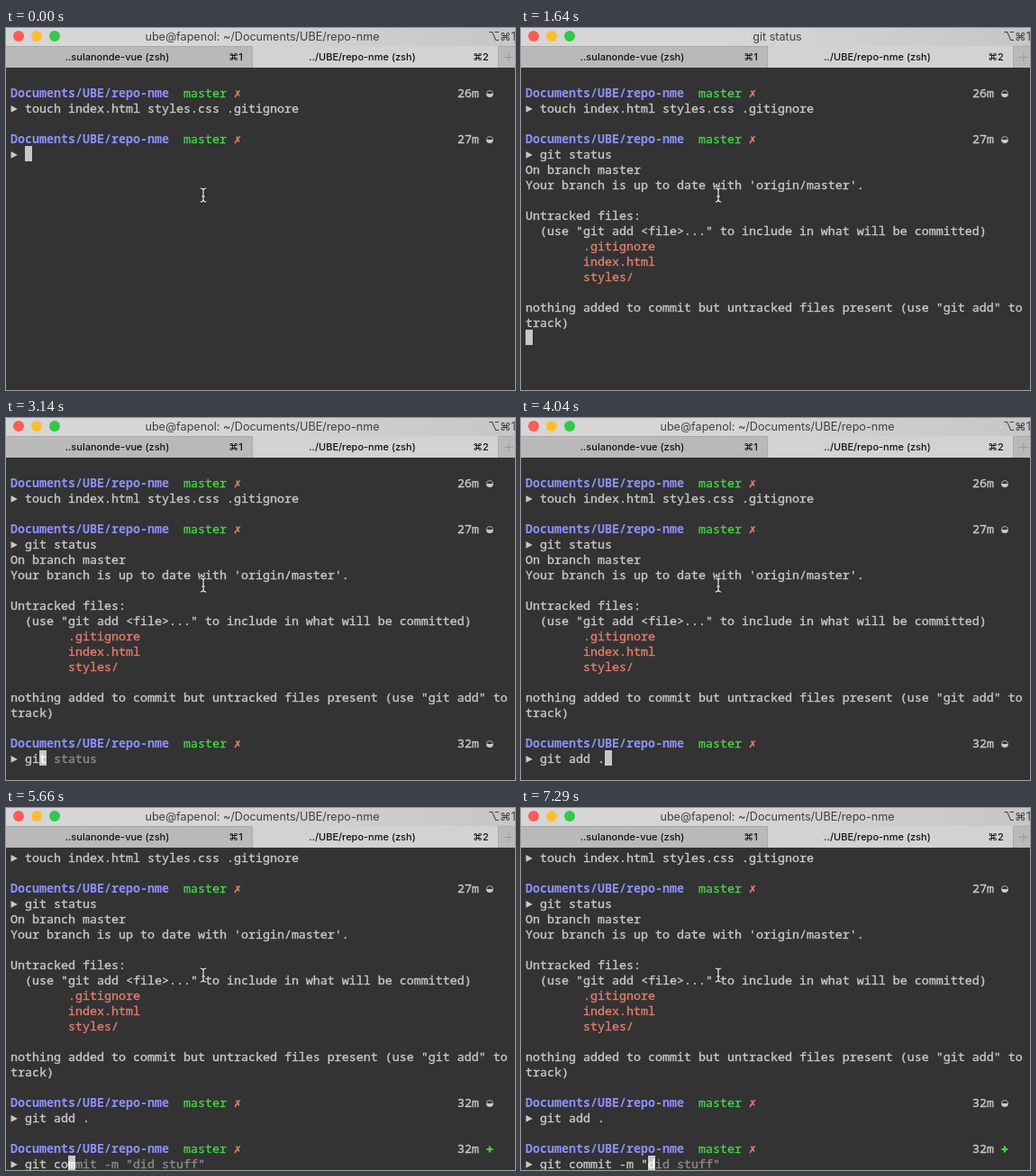
Animation, 565 px wide and 402 px high, one loop 8 s. Source, as an HTML page:

```html
<!DOCTYPE html>
<html lang="en">
<head>
<meta charset="utf-8">
<title>Terminal</title>
<style>
  html, body { margin: 0; width: 100%; height: 100%; overflow: hidden; background: #333; }
  svg { display: block; }
  text { white-space: pre; }
  .term text { font: 13.333px "Noto Sans Mono", "DejaVu Sans Mono", monospace; stroke-width: .35; }
  .term .bold { font-weight: 700; stroke-width: 0; }
  .bar text { font: 500 11px Inter, "DejaVu Sans", sans-serif; fill: #111; text-anchor: middle; }
  .bar .title { font-size: 12.6px; font-weight: 400; fill: #404040; }
</style>
</head>
<body>
<svg width="565" height="402" viewBox="0 0 565 402">
  <defs>
    <linearGradient id="chrome">
      <stop offset=".4" stop-color="#d6d6d6"/><stop offset="1" stop-color="#c6c6c6"/>
    </linearGradient>
    <path id="beam" d="M216 178Q219 178 219 180.5Q219 178 222 178M219 180.5V190.5M216 193Q219 193 219 190.5Q219 193 222 193M217.5 187H220.5"/>
  </defs>
  <rect width="565" height="402" fill="#333"/>
  <g class="term" id="term"></g>
  <g class="bar">
    <rect width="565" height="20" fill="url(#chrome)"/>
    <rect y="20" width="565" height="24" fill="#b9b9b9"/>
    <rect x="274" y="20" width="272" height="24" fill="#d2d2d2"/>
    <path d="M0 20.5H273.5V44M546.5 44V20.5H565" fill="none" stroke="#a9a9a9"/>
    <circle cx="14" cy="9" r="6" fill="#fc5b56"/>
    <circle cx="34" cy="9" r="6" fill="#fdbd30"/>
    <circle cx="54" cy="9" r="6" fill="#34c749"/>
    <text class="title" id="title" x="284.5" y="14"></text>
    <text class="title" x="550.5" y="14">⌥⌘1</text>
    <text x="123.5" y="36">..sulanonde-vue (zsh)</text>
    <text x="255" y="36">⌘1</text>
    <text id="tab" x="395.5" y="36"></text>
    <text x="527" y="36">⌘2</text>
    <path d="M553 32.5H563M558 27.5V37.5" stroke="#999"/>
  </g>
  <g fill="none" stroke-linecap="round">
    <use href="#beam" stroke="#222" stroke-width="2.4"/>
    <use href="#beam" stroke="#f0f0f0" stroke-width="1.2"/>
  </g>
</svg>
<script>
const LOOP = 8000, CELL = 8, ROW = 17, LEFT = 5, TOP = 63;
const FG = '#c9c9c9', BLUE = '#8d90ff', GREEN = '#43d545', RED = '#e47d6d', GHOST = '#8b8b8b', CURSOR = '#c7c7c7';
const PATH = 'Documents/UBE/repo-nme';
const STATUS = 'git status', ADD = 'git add .', COMMIT = 'git commit -m "did stuff"';
const OUTPUT = [
  'On branch master',
  "Your branch is up to date with 'origin/master'.",
  '',
  'Untracked files:',
  '  (use "git add <file>..." to include in what will be committed)',
  '        .gitignore',
  '        index.html',
  '        styles/',
  '',
  'nothing added to commit but untracked files present (use "git add" to',
  'track)'
];

const [TYPE_STATUS, RUN_STATUS, DONE_STATUS, TYPE_ADD, RUN_ADD, DONE_ADD, TYPE_COMMIT] = [0, 1, 2, 3, 4, 5, 6];

// [time, stage, characters typed]
const STEPS = [
  [0, TYPE_STATUS, 0], [600, TYPE_STATUS, 1], [750, TYPE_STATUS, 2], [900, TYPE_STATUS, 3],
  [1040, TYPE_STATUS, 5], [1190, TYPE_STATUS, 6], [1340, TYPE_STATUS, 8], [1490, TYPE_STATUS, 10],
  [1640, RUN_STATUS, 0], [1790, DONE_STATUS, 0], [1940, TYPE_ADD, 0],
  [3140, TYPE_ADD, 2], [3290, TYPE_ADD, 3], [3440, TYPE_ADD, 4], [3590, TYPE_ADD, 5],
  [3740, TYPE_ADD, 6], [3890, TYPE_ADD, 8], [4040, TYPE_ADD, 9],
  [4180, RUN_ADD, 9], [4330, DONE_ADD, 0], [4470, TYPE_COMMIT, 0],
  [5070, TYPE_COMMIT, 1], [5220, TYPE_COMMIT, 2], [5370, TYPE_COMMIT, 3], [5520, TYPE_COMMIT, 5],
  [5660, TYPE_COMMIT, 6], [5810, TYPE_COMMIT, 7], [5960, TYPE_COMMIT, 8], [6100, TYPE_COMMIT, 9],
  [6250, TYPE_COMMIT, 10], [6400, TYPE_COMMIT, 11], [6540, TYPE_COMMIT, 12],
  [6690, TYPE_COMMIT, 13], [6840, TYPE_COMMIT, 14], [7290, TYPE_COMMIT, 15]
];

const $ = id => document.getElementById(id);
const term = $('term');
let scroll = 0;

const colX = col => LEFT + col * CELL;
const rowY = row => TOP + (row - scroll) * ROW;
const visible = row => rowY(row) >= 46;

function add(tag, attrs, text = '') {
  const el = document.createElementNS('http://www.w3.org/2000/svg', tag);
  for (const k in attrs) el.setAttribute(k, attrs[k]);
  el.textContent = text;
  term.append(el);
}

function write(row, col, text, color = FG, cls = '') {
  if (!text || !visible(row)) return;
  add('text', { x: colX(col), y: rowY(row) + 14, fill: color, stroke: color, class: cls }, text);
}

function shape(row, d, attrs) {
  if (visible(row)) add('path', { d, transform: `translate(0 ${rowY(row)})`, ...attrs });
}

function prompt(row, age, staged) {
  write(row, 0, PATH, BLUE, 'bold');
  write(row, 24, 'master', GREEN);
  write(row, 31, '✗', RED);
  write(row, 62, age);
  if (staged) {
    shape(row, 'M533.5 10H540.5M537 6.5V13.5', { stroke: GREEN, 'stroke-width': 2.2 });
  } else {
    shape(row, 'M533.5 10A3.5 3.5 0 0 1 540.5 10', { fill: 'none', stroke: FG, 'stroke-width': .8 });
    shape(row, 'M533.1 10H540.9A3.9 3.9 0 0 1 533.1 10Z', { fill: FG });
  }
}

function command(row, text) {
  shape(row, 'M5.5 6L12.8 9.9L5.5 13.8Z', { fill: FG });
  write(row, 2, text);
}

function cursor(row, col, char = '') {
  add('rect', { x: colX(col), y: rowY(row), width: CELL, height: ROW, fill: CURSOR });
  write(row, col, char.trim(), '#fff');
}

function typing(row, line, n) {
  command(row, line.slice(0, n));
  const rest = n ? line.slice(n) : '';
  write(row, 3 + n, rest.slice(1), GHOST);
  cursor(row, 2 + n, rest.slice(0, 1));
}

function draw([, stage, n]) {
  term.replaceChildren();
  scroll = stage === TYPE_COMMIT ? 2 : 0;
  $('title').textContent = stage === RUN_STATUS ? STATUS : 'ube@fapenol: ~/' + PATH;
  $('tab').textContent = `../UBE/repo-nme (${stage === RUN_ADD ? 'git' : 'zsh'})`;

  prompt(0, '26m');
  command(1, 'touch index.html styles.css .gitignore');
  prompt(3, '27m');
  if (stage === TYPE_STATUS) return typing(4, STATUS, n);

  command(4, STATUS);
  OUTPUT.forEach((line, i) => write(5 + i, 0, line, i > 4 && i < 8 ? RED : FG));
  if (stage <= DONE_STATUS) return cursor(16, 0);

  prompt(17, '32m');
  if (stage <= RUN_ADD) return typing(18, n < 5 ? STATUS : ADD, n);

  command(18, ADD);
  if (stage === DONE_ADD) return cursor(19, 0);

  prompt(20, '32m', true);
  typing(21, n < 5 ? ADD : COMMIT, n);
}

const start = performance.now();
let shown;
function tick() {
  const t = (performance.now() - start) % LOOP;
  const step = STEPS.findLast(s => s[0] <= t);
  if (step !== shown) draw(shown = step);
  requestAnimationFrame(tick);
}
tick();
</script>
</body>
</html>
```
